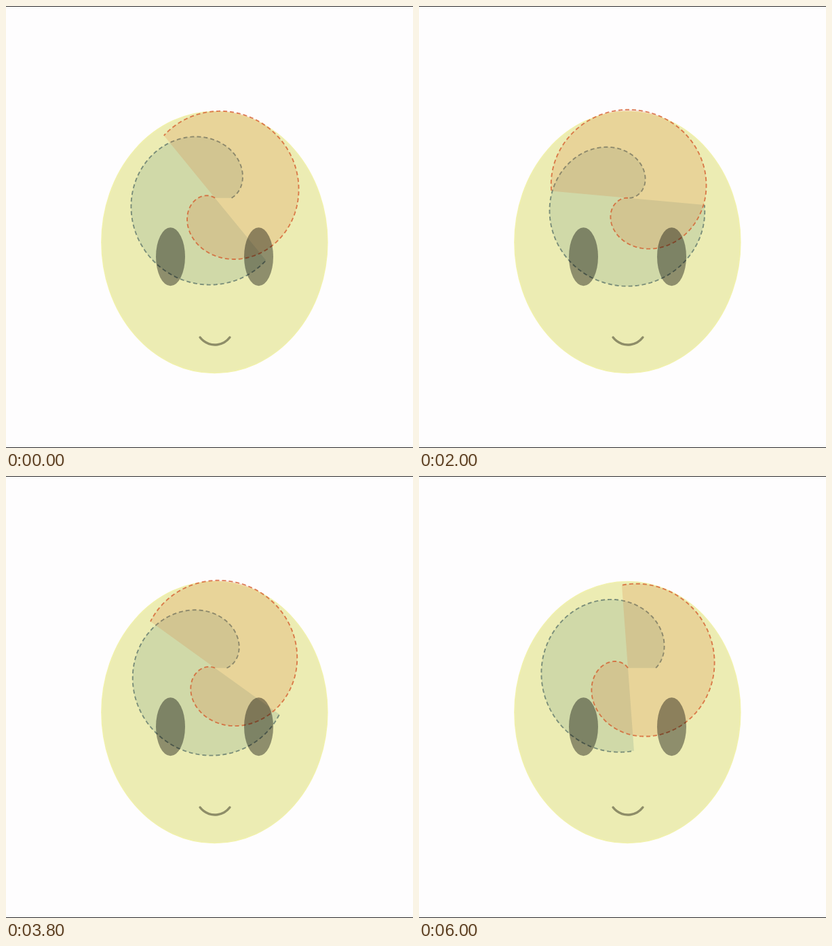
Animation of 600x651 px, one loop 6.1 s. Source, as an HTML page with a canvas:

```html
<!DOCTYPE html>
<html lang="en">
<head>
<meta charset="utf-8">
<title>Spiral face</title>
<style>
  html, body { margin: 0; width: 100%; height: 100%; overflow: hidden; background: #fefdfe; }
  canvas { display: block; }
</style>
</head>
<body>
<canvas id="stage" width="600" height="651"></canvas>
<script>
const ctx = document.getElementById('stage').getContext('2d');
const LOOP = 6100, STEP = 100;
const CENTER = { x: 308, y: 282.7 }, RADIUS = 130;
const DEG = Math.PI / 180;
const SPEED = 22.75;      // degrees per second
const TURNAROUND = 2.229; // seconds until the spirals close

function ellipse(x, y, rx, ry) {
  ctx.beginPath();
  ctx.ellipse(x, y, rx, ry, 0, 0, 2 * Math.PI);
}

// Arc of r = R sin(a / 3 + phase), angles in degrees, turned by `turn`.
function spiral(from, to, phase, turn) {
  const path = new Path2D();
  const count = 240;
  for (let i = 0; i <= count; i++) {
    const a = from + (to - from) * i / count;
    const r = RADIUS * Math.sin((a / 3 + phase) * DEG);
    const angle = (a + turn) * DEG;
    path.lineTo(CENTER.x + r * Math.cos(angle), CENTER.y - r * Math.sin(angle));
  }
  return path;
}

function drawSpiral(path, fill, stroke) {
  const area = new Path2D(path);
  area.lineTo(CENTER.x, CENTER.y);
  area.closePath();
  ctx.fillStyle = fill;
  ctx.fill(area);
  ctx.strokeStyle = stroke;
  ctx.lineWidth = 1.9;
  ctx.lineCap = 'butt';
  ctx.setLineDash([6, 4]);
  ctx.stroke(path);
  ctx.setLineDash([]);
}

function drawFace() {
  ellipse(307.4, 348, 166.5, 192.5);
  ctx.fillStyle = '#ececb3';
  ctx.fill();
  ctx.strokeStyle = '#f1f1ac';
  ctx.lineWidth = 1.5;
  ctx.stroke();
}

function drawFeatures() {
  ctx.fillStyle = 'rgba(0, 0, 0, 0.4)';
  for (const x of [242.5, 372.5]) {
    ellipse(x, 369.3, 21.5, 43);
    ctx.fill();
  }
  ctx.beginPath();
  ctx.arc(308, 471.5, 27.5, 37 * DEG, 143 * DEG);
  ctx.strokeStyle = '#8e8d68';
  ctx.lineWidth = 3.4;
  ctx.lineCap = 'round';
  ctx.stroke();
}

function draw(ms) {
  const gap = SPEED * Math.abs(ms / 1000 - TURNAROUND);
  const phase = gap * 0.2148;
  const end = 360 - gap;

  ctx.fillStyle = '#fefdfe';
  ctx.fillRect(0, 0, 600, 651);
  drawFace();
  drawSpiral(spiral(0, end, phase, 0), 'rgba(49, 109, 111, 0.15)', 'rgba(70, 98, 94, 0.66)');
  drawSpiral(spiral(-3 * phase, end, phase, 180), 'rgba(216, 116, 53, 0.2)', 'rgba(212, 88, 42, 0.75)');
  drawFeatures();
  ctx.fillStyle = '#2a2a2a';
  ctx.fillRect(0, 0, 600, 1);
  ctx.fillRect(0, 650, 600, 1);
}

const start = performance.now();
function tick() {
  const ms = (performance.now() - start) % LOOP;
  draw(Math.floor(ms / STEP) * STEP);
  requestAnimationFrame(tick);
}
tick();
</script>
</body>
</html>
```
